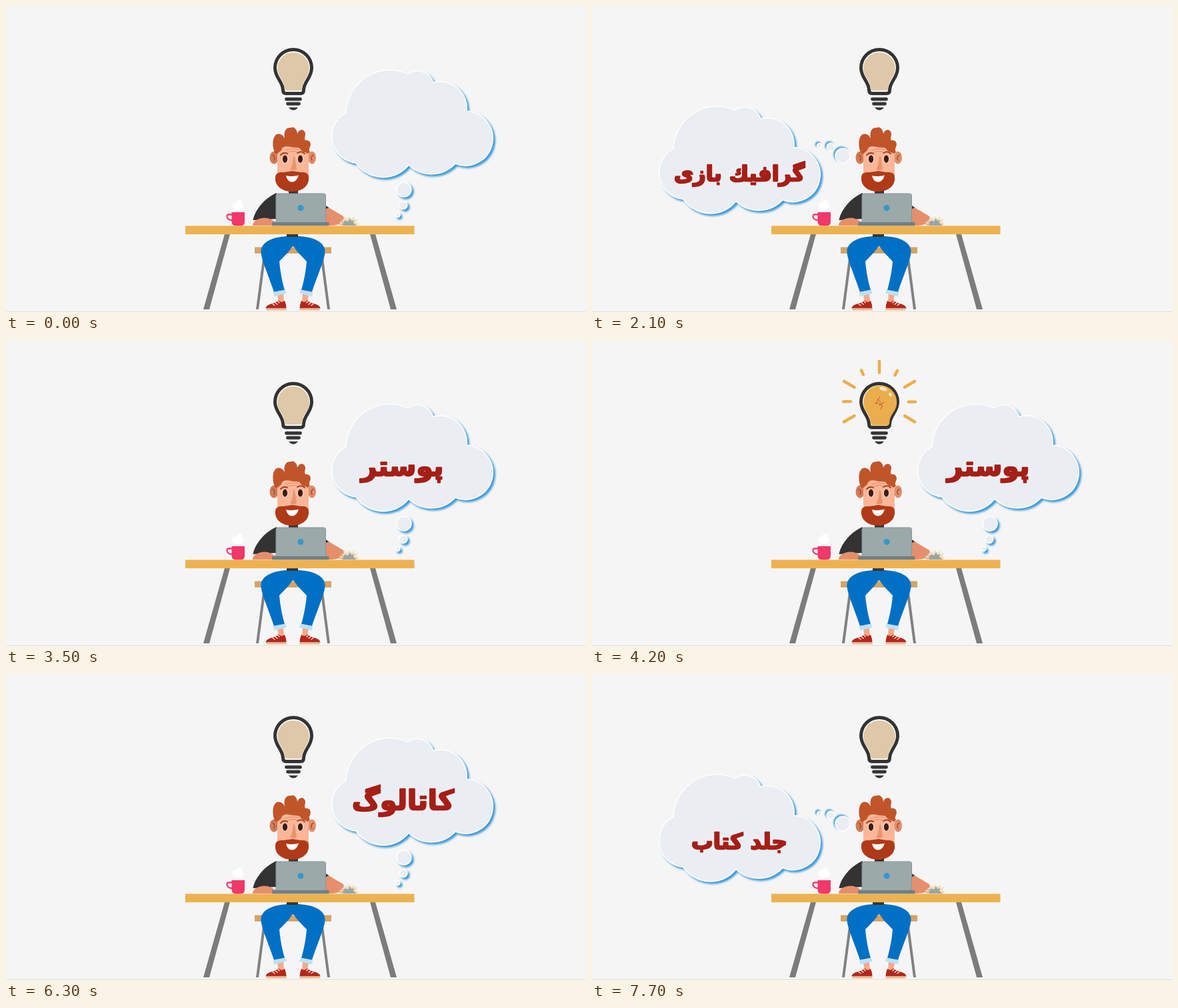
Animation of 870x460 px, one loop 8000 ms. Source, as an HTML page:

```html
<!DOCTYPE html>
<html lang="fa">
<head>
<meta charset="utf-8">
<title>Ideas at the desk</title>
<style>
  html, body { margin: 0; width: 100%; height: 100%; overflow: hidden; background: #f5f5f5; }
  svg { display: block; }
  .line { fill: none; stroke-linecap: round; stroke-linejoin: round; }
  .puff { fill: #eaeef3; stroke: #fff; stroke-width: 1.5; }
  .shade { filter: drop-shadow(3px 3px 1.8px #3d9ad8); }
  .shade-up { filter: drop-shadow(-1.5px -2px 1px #45a0dc); }
  #word {
    font-family: "DejaVu Sans", sans-serif; font-weight: bold;
    fill: #a61f17; stroke: #a61f17; stroke-width: 2.4; stroke-linejoin: round;
    text-anchor: middle; direction: rtl;
  }
</style>
</head>
<body>
<svg width="870" height="460" viewBox="0 0 870 460">
  <defs>
    <path id="cloud" class="puff shade" d="M525 236A40.5 40.5 0 0 1 510 160A66 66 0 0 1 603 102A25 25 0 0 1 641 115A40 40 0 0 1 691 158A41 41 0 1 1 674 237A49 49 0 0 1 604 239A49 49 0 0 1 525 236Z"/>
    <path id="glass" d="M403.5 93C403.5 108 415 113 415.5 126Q415.5 131.5 420 131.5H442Q446.5 131.5 446.5 126C447 113 458.5 108 458.5 93A27.5 27.5 0 0 0 403.5 93Z"/>
    <path id="tableLeg" fill="#7c7c7c" d="M328 343H336L305 456H296Z"/>
    <path id="stoolLeg" fill="#808181" d="M386 372H390L379 456H375Z"/>
    <g id="leg">
      <path fill="#f2ab8c" d="M407 434L416 432 417 445 409 446Z"/>
      <path fill="#0070c4" d="M431 346C400 345 383 355 382.5 368C382 380 393 402 402 430L418 427C413 410 411 395 410 384C416 377 424 371 429 362L431 361Z"/>
      <path fill="#bfe0f3" d="M401 430L419 426.5 421 432 402 436.5Z"/>
      <path fill="#b3271d" d="M418 443Q420.500 449 420.500 454.500H389.500Q390 450 397 448Q405 446 409 442.500Q413 447 418 443Z"/>
      <path fill="#e6bd92" d="M389.500 454.500H420.500V457.500H391Z"/>
      <path class="line" stroke="#fbe6d6" stroke-width="1.5" d="M400 448L403 450M404 446L407 448.500M408 444L410 446"/>
    </g>
  </defs>

  <rect width="870" height="460" fill="#f5f5f5"/>
  <path stroke="#dedede" d="M0 459.5H870"/>

  <g id="right">
    <use href="#cloud"/>
    <g class="puff shade">
      <circle cx="597" cy="276" r="11"/><circle cx="596" cy="299.5" r="6"/><circle cx="587.5" cy="314" r="3.5"/>
    </g>
  </g>
  <g id="left">
    <use href="#cloud" x="-388" y="54.5"/>
    <g class="puff shade-up">
      <circle cx="376" cy="225" r="11"/><circle cx="358" cy="212" r="6"/><circle cx="341" cy="210" r="3.5"/>
    </g>
  </g>
  <text id="word"></text>

  <!-- light bulb -->
  <use href="#glass" fill="#fff" stroke="#333" stroke-width="5"/>
  <use id="glow" href="#glass"/>
  <path class="line" stroke="#333" stroke-width="4.8" d="M420.5 140H441.5M422.5 147H439.5"/>
  <path fill="#333" d="M424 152.5H438Q435 156.5 431 156.5T424 152.5Z"/>
  <g id="shine">
    <path class="line" stroke="#ebae4c" stroke-width="4.5" d="M431 32V49M404 45.5L407 52M458 46L454.5 53M378 62L393.5 71M484 62L469 71M377 92.5H388M475 93H485M378 123L393.5 114M484 123L469 114"/>
    <g fill="#f9e6c6">
      <ellipse cx="437" cy="73.5" rx="6" ry="2.8" transform="rotate(17 437 73.5)"/>
      <ellipse cx="447.5" cy="82" rx="2" ry="3" transform="rotate(-30 447.5 82)"/>
    </g>
    <path class="line" stroke="#c4553a" d="M432 85L425 96 430 94M429 89L433 93M438 94L430 97 436 98 433 104"/>
  </g>

  <!-- stool and legs -->
  <use href="#stoolLeg"/><use href="#stoolLeg" transform="matrix(-1 0 0 1 861 0)"/>
  <rect x="373" y="362.5" width="115" height="9.5" fill="#d3a468"/>
  <use href="#leg"/><use href="#leg" transform="matrix(-1 0 0 1 861 0)"/>
  <rect x="421" y="342" width="17" height="5" fill="#333"/>

  <!-- body -->
  <path fill="#333" d="M424 276H438V283H424ZM406 281C391 287 374 304 370.5 322L406 320ZM478 299L484.5 303 479 309Z"/>
  <path fill="#e58f6c" d="M370 330C370 321 384 317 393 319L406 325V330ZM478 306L484 303 506 316C509 325 501 330 486 330H478Z"/>

  <!-- head -->
  <ellipse cx="402" cy="228" rx="6.5" ry="9.5" fill="#d07b56"/>
  <ellipse cx="459" cy="228" rx="6" ry="9.5" fill="#e18d69"/>
  <path class="line" stroke="#a94f30" stroke-width="1.5" d="M400 224Q405 227 402 232M461 224Q456 227 459 232"/>
  <path fill="#fbb698" d="M407 214Q430 196 454 214V256Q430 276 407 256Z"/>
  <path fill="#c1552a" d="M404 222C399 213 399 198 405 193.5C410 190 416 194 418 199C416 188 420 182 427 183C433 180 437 188 437 192C440 184 448 185 449 192C449 196 447 199 449 202C454 201 459 205 456 212C454 216 455 217 456 220L452 222C450 219 446 221 442 216C440 211 434 214 428 212C420 210 414 211 413 217L407 222Z"/>
  <g class="line" stroke="#d98d6d">
    <path d="M419 217Q429 213 439 216M422 220Q430 217 436 219"/>
    <path stroke="#a8421f" stroke-width="2" d="M412 224Q417 219 422 222M437 221Q443 217 448 222"/>
  </g>
  <g fill="#fddccb"><ellipse cx="418.5" cy="230" rx="5" ry="6.5"/><ellipse cx="441.5" cy="230" rx="5" ry="6.5"/></g>
  <g fill="#3d1d14"><ellipse cx="418.5" cy="230" rx="3.7" ry="5.7"/><ellipse cx="441.5" cy="230" rx="3.7" ry="5.7"/></g>
  <path fill="#e7956f" d="M431 226H433L436 245Q431 249 426 245Q430 241 431 226Z"/>
  <path fill="#b03a18" d="M404 258C404 250 411 250 416 250Q424 249 429.5 248Q436 249 442 250C448 250 454 250 454 258C455 271 443 279 429 279S403 271 404 258Z"/>
  <path fill="#fff" d="M420 255Q429 257 439 254.5Q436 264.5 429 264.5T420 255Z"/>

  <!-- desk -->
  <rect x="405" y="282" width="74.5" height="45" rx="3" fill="#9ba9a9" stroke="#87959a"/>
  <circle cx="442" cy="303.5" r="4.5" fill="#3498ca"/>
  <rect x="399" y="325" width="85.5" height="5.5" rx="1" fill="#708087"/>
  <path fill="#f1dfba" d="M501 329L504 321 508 323 507 317 512 320 515 315.5 517 320 523 316.5 522 321 528 320 525 325 530 328 526 330H503Z"/>
  <path fill="#98a6a7" d="M505 330L508 322 513 324 516 319 518 323 522 322 521 326 526 330Z"/>
  <ellipse cx="503" cy="326" rx="3.5" ry="2.5" fill="#f4cdb0" stroke="#c98a68" stroke-width=".8"/>
  <g fill="#fff"><circle cx="344" cy="300" r="4.5"/><circle cx="351" cy="301" r="5.5"/><circle cx="350" cy="294.5" r="3.8"/><circle cx="346" cy="303" r="4"/></g>
  <path fill="#f0386b" d="M338.5 310H358V324Q358 330.5 352 330.5H345Q338.5 330.5 338.5 324Z"/>
  <path class="line" stroke="#f0386b" stroke-width="2.3" d="M339 313.5H334Q331 313.5 331.5 317Q333 322 339 322"/>
  <use href="#tableLeg"/><use href="#tableLeg" transform="matrix(-1 0 0 1 882 0)"/>
  <rect x="269" y="330.5" width="343.5" height="12.7" fill="#edb250"/>
</svg>
<script>
  const LOOP = 8000, STEP = 700;
  // word, centre x, baseline y, font size
  const words = [
    ["تراکت", 596.5, 204, 40],
    ["گرافيك بازی", 221, 263, 32],
    ["پوستر", 594.5, 204, 41],
    ["لوگو", 208, 247, 33],
    ["کاتالوگ", 595.5, 204, 41],
    ["جلد کتاب", 221, 263, 32.5]
  ];
  const el = id => document.getElementById(id);
  const show = (id, on) => el(id).setAttribute("visibility", on ? "visible" : "hidden");

  // fills the glass, leaving a white rim; when lit the rim stays only on the left
  function drawGlow(lit) {
    const scale = lit ? 0.91 : 0.87, shift = lit ? 1.2 : 0;
    const glow = el("glow");
    glow.setAttribute("fill", lit ? "#ebae4c" : "#dfc8a8");
    glow.setAttribute("transform", `translate(${431 + shift} 98) scale(${scale}) translate(-431 -98)`);
  }

  function draw(time) {
    const step = Math.floor(time % LOOP / STEP);
    const index = Math.floor((step - 1) / 2);
    const lit = step > 0 && step % 2 === 0;
    const onLeft = index > 0 && index % 2 === 1;
    show("left", onLeft);
    show("right", !onLeft);
    show("shine", lit);
    drawGlow(lit);

    const [text, x, y, size] = words[index] || ["", 0, 0, 40];
    const word = el("word");
    word.textContent = text;
    word.setAttribute("x", x);
    word.setAttribute("y", y);
    word.setAttribute("font-size", size);
  }

  function tick() {
    draw(performance.now());
    requestAnimationFrame(tick);
  }
  tick();
</script>
</body>
</html>
```
